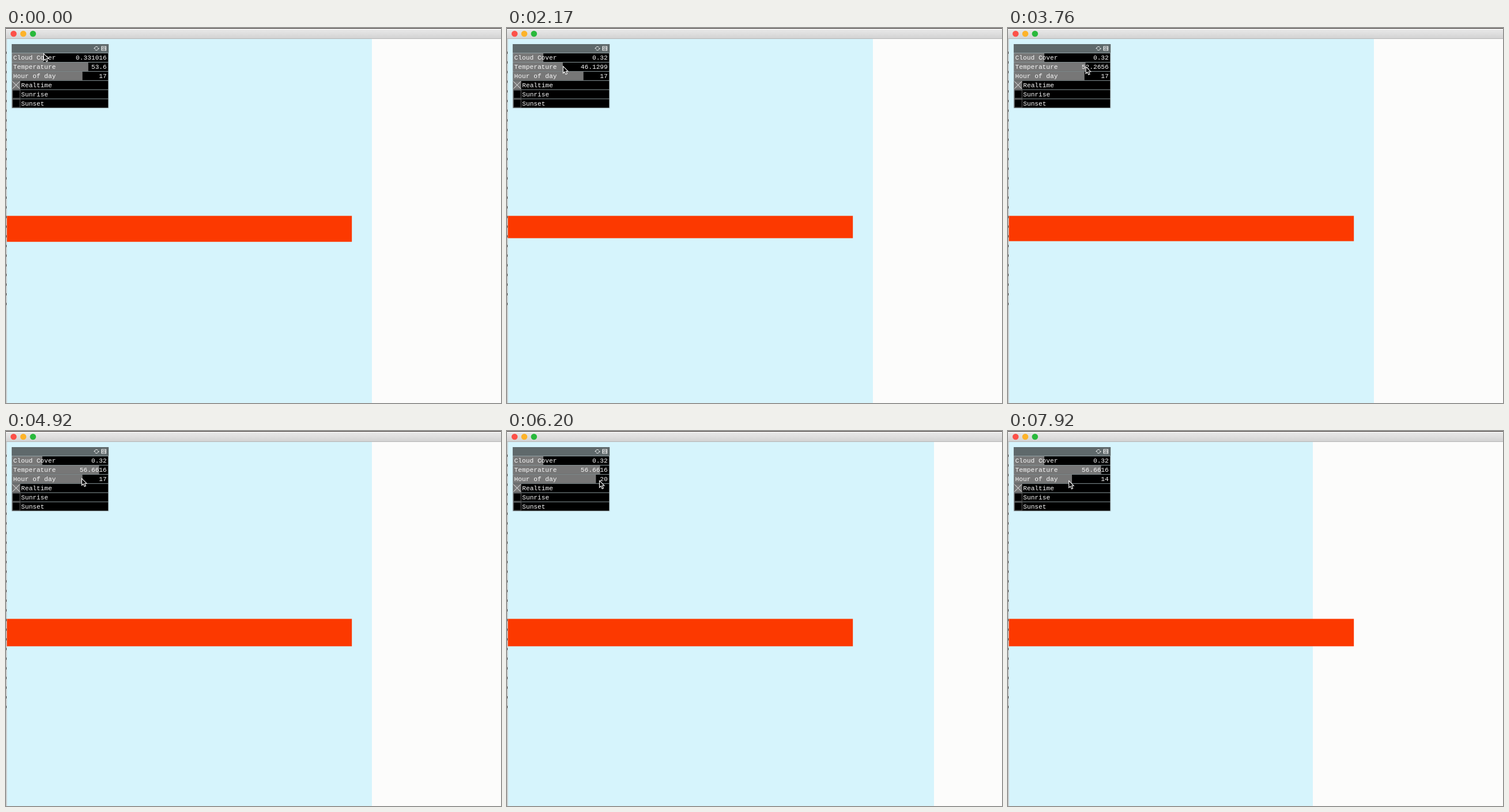
Animation, 859 px wide and 652 px high, one loop 8 s. Source, as an HTML page with a canvas:

```html
<!DOCTYPE html>
<html lang="en">
<head>
<meta charset="utf-8">
<title>Weather panel</title>
<style>
  html, body { margin: 0; width: 100%; height: 100%; overflow: hidden; }
  canvas { display: block; }
</style>
</head>
<body>
<canvas id="stage" width="859" height="652"></canvas>
<script>
const ctx = document.getElementById('stage').getContext('2d');
const LOOP = 8000;
const REST = 100;      // pause at every stop of the pointer
const HOUR_LAG = 80;   // the hour slider trails the pointer
const PANEL = { x: 10, y: 28, width: 168, pitch: 15.92, rowHeight: 15.1 };
const SLIDER_WIDTH = 166;

// Pointer stops: arrival time, position along the slider (0 to 1), height.
const stops = [
  [-50, .331016, 44], [300, .32, 46], [1150, .8, 66],
  [1410, .779593, 66], [2790, .291104, 66], [4200, .913393, 67],
  [4920, .729, 82], [5400, .735, 83], [6600, .975, 87],
  [7300, .937, 88], [LOOP, .555, 86]
];

const clamp = (v, low, high) => Math.min(high, Math.max(low, v));
const smooth = k => k * k * (3 - 2 * k);

function pointerAt(time) {
  const next = Math.max(1, stops.findIndex(stop => stop[0] >= time));
  const [start, p0, y0] = stops[next - 1];
  const [end, p1, y1] = stops[next];
  const k = smooth(clamp((time - start - REST) / (end - start - REST), 0, 1));
  return { part: p0 + (p1 - p0) * k, y: y0 + (y1 - y0) * k };
}

// A slider follows the pointer from grab to release and rests otherwise.
const dragged = (time, grab, release) => pointerAt(clamp(time, grab, release)).part;

function rect(color, x, y, w, h) {
  ctx.fillStyle = color;
  ctx.fillRect(x, y, w, h);
}

function text(value, x, y, align = 'left') {
  ctx.fillStyle = '#f8f8f8';
  ctx.textAlign = align;
  ctx.fillText(value, x, y);
}

function drawWindow() {
  rect('#fcfcfb', 0, 0, 859, 652);
  const bar = ctx.createLinearGradient(0, 1, 0, 19);
  bar.addColorStop(0, '#ebebeb');
  bar.addColorStop(1, '#d1d1d1');
  rect(bar, 0, 0, 859, 19);
  rect('#302825', 0, 0, 859, 1);
  rect('#b5b5b5', 0, 18, 859, 1);
  ['#fc5149', '#fdb32a', '#29b93c'].forEach((color, i) => {
    ctx.fillStyle = color;
    ctx.beginPath();
    ctx.arc(13.2 + i * 16.8, 10, 5.3, 0, Math.PI * 2);
    ctx.fill();
  });
}

function drawLeftEdge() {
  rect('#c5cacb', 0, 19, 1.6, 633);
  for (let y = 41; y < 480; y += 16.8) rect('#444', 0, y, 1, 4);
}

function drawRow(index, label, labelX, fillWidth) {
  const top = PANEL.y + index * PANEL.pitch;
  rect('#000', PANEL.x + .8, top, PANEL.width - 1.6, PANEL.rowHeight);
  rect('#777', PANEL.x + .8, top, fillWidth, PANEL.rowHeight);
  text(label, labelX, top + 11.4);
  return top;
}

function drawSlider(index, label, value, part) {
  const top = drawRow(index, label, 12.6, SLIDER_WIDTH * part - .8);
  text(value, 174.8, top + 11.4, 'right');
}

function drawToggle(index, label, checked) {
  const top = drawRow(index, label, 26.2, checked ? 13.4 : 0);
  ctx.lineWidth = 1;
  ctx.strokeStyle = '#626262';
  ctx.strokeRect(11.3, top + .5, 13, 14);
  if (!checked) return;
  ctx.strokeStyle = '#eee';
  ctx.stroke(new Path2D(`M11 ${top + 1}l13 13m0 -13l-13 13`));
}

function drawHeaderIcons() {
  ctx.strokeStyle = ctx.fillStyle = '#eee';
  ctx.lineWidth = 1;
  [0, Math.PI].forEach(turn => {
    ctx.save();
    ctx.translate(157, 35.5);
    ctx.rotate(turn);
    ctx.beginPath();
    ctx.arc(0, 0, 3.2, -2.7, -.6);
    ctx.stroke();
    ctx.fill(new Path2D('M1.6 -.6H5L3.3 1.4Z'));
    ctx.restore();
  });
  rect('#eee', 165.5, 31.5, 8.5, 8);
  ctx.strokeStyle = '#5f696b';
  ctx.strokeRect(167.5, 32.8, 4.5, 2);
  ctx.strokeRect(167.5, 36.6, 4.5, 1.6);
}

function drawPanel(cloud, temp, hour) {
  const { x, y, width, pitch, rowHeight } = PANEL;
  rect('#a9b9bd', x - .3, y, width + .8, pitch * 7);
  rect('#5f696b', x, y, width, rowHeight);
  drawHeaderIcons();
  ctx.font = '11.2px "Liberation Mono", monospace';
  drawSlider(1, 'Cloud Cover', +cloud.toPrecision(6), cloud);
  drawSlider(2, 'Temperature', +temp.toPrecision(6), (temp - 32) / 27);
  drawSlider(3, 'Hour of day', hour, hour / 23);
  drawToggle(4, 'Realtime', true);
  drawToggle(5, 'Sunrise', false);
  drawToggle(6, 'Sunset', false);
}

function drawPointer({ part, y }) {
  ctx.save();
  ctx.translate(PANEL.x + SLIDER_WIDTH * part, y);
  const arrow = new Path2D('M.5 .5V12.5L3.2 10L5.2 14.6L7.4 13.6L5.4 9.2H9Z');
  ctx.fillStyle = '#000';
  ctx.fill(arrow);
  ctx.strokeStyle = '#fff';
  ctx.lineWidth = 1.1;
  ctx.stroke(arrow);
  ctx.restore();
}

function draw(time) {
  const cloud = dragged(time, 0, 300);
  const temp = 32 + 27 * dragged(time, 1150, 4300);
  const hour = Math.round(23 * dragged(time - HOUR_LAG, 4920, LOOP));
  drawWindow();
  rect('#d6f4fc', 1.5, 19, Math.round(36 + 35.23 * hour) - 1.5, 633);
  drawLeftEdge();
  rect('#fc3900', 1.5, 326.6, 598.7, temp * .842);
  drawPanel(cloud, temp, hour);
  drawPointer(pointerAt(time));
}

function frame(now) {
  draw(now % LOOP);
  requestAnimationFrame(frame);
}
requestAnimationFrame(frame);
</script>
</body>
</html>
```
